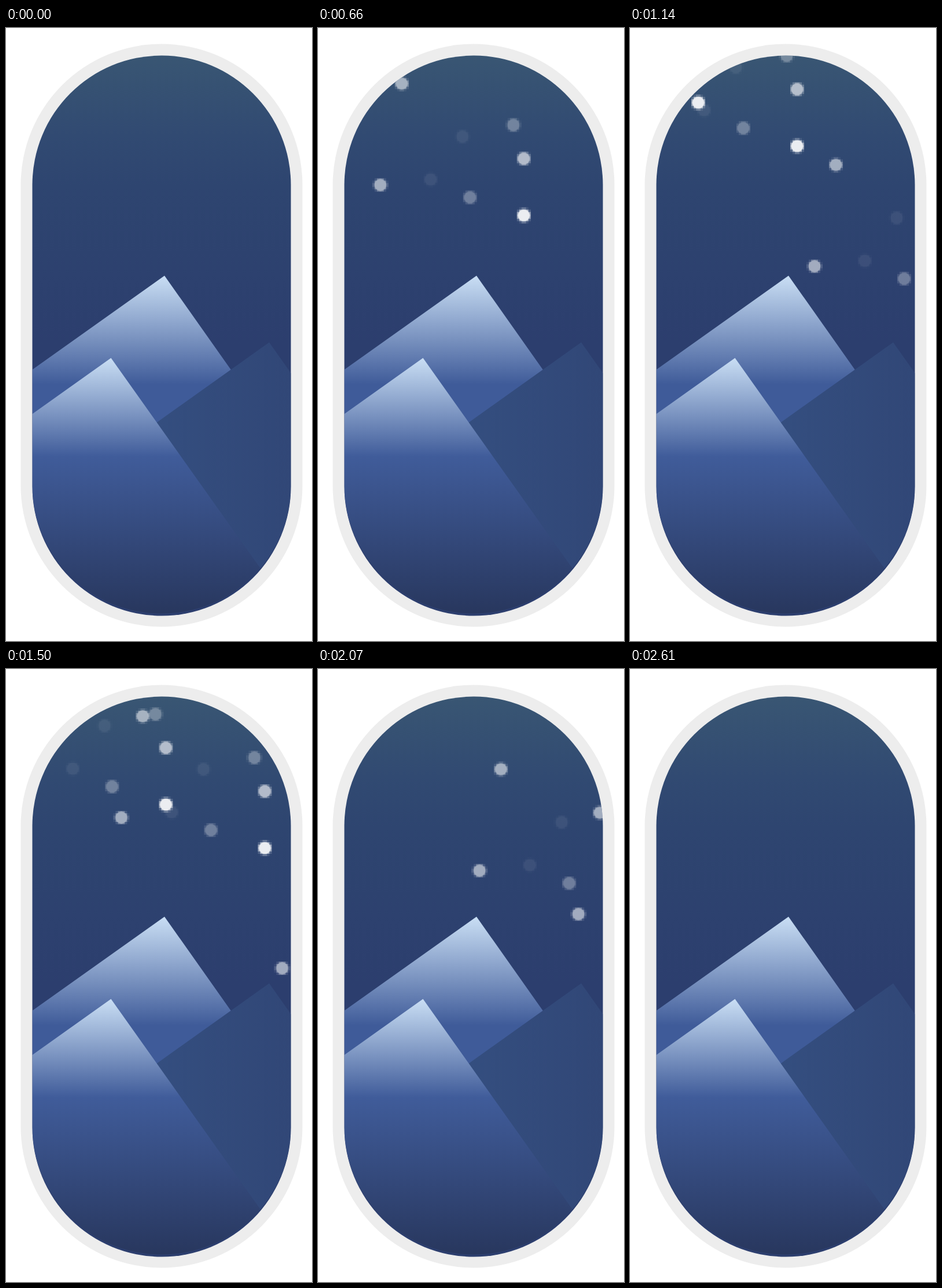
An HTML page that plays this animation: 529 by 1058 pixels, repeating every 2700 ms.

```html
<!DOCTYPE html>
<html lang="en">
<head>
<meta charset="utf-8">
<title>Night peaks</title>
<style>
  html, body { margin: 0; width: 100%; height: 100%; overflow: hidden; background: #fff; }
  svg { display: block; width: 100%; height: 100%; }
  /* 30 ms ticks; the small lead keeps each tick clear of its boundary */
  #sky { animation: drift 2700ms steps(90, end) -4ms infinite; }
  @keyframes drift {
    from { transform: translate(65.4px, 130.5px); }
    to { transform: translate(1253.4px, 919.7px); }
  }
</style>
</head>
<body>
<svg viewBox="0 0 529 1058" xmlns="http://www.w3.org/2000/svg">
  <defs>
    <clipPath id="window">
      <rect x="45.5" y="47.5" width="447" height="967" rx="223.5"/>
    </clipPath>
    <clipPath id="ground">
      <path d="M45.5 400H492.5V790.5A223.5 220 0 0 1 45.5 790.5Z"/>
    </clipPath>
    <linearGradient id="night" gradientUnits="userSpaceOnUse" x1="0" y1="47" x2="0" y2="547">
      <stop offset="0" stop-color="#395673"/>
      <stop offset=".28" stop-color="#314a72"/>
      <stop offset=".45" stop-color="#2e4570"/>
      <stop offset="1" stop-color="#2c3e6e"/>
    </linearGradient>
    <linearGradient id="back" gradientUnits="userSpaceOnUse" x1="0" y1="428" x2="0" y2="615">
      <stop offset="0" stop-color="#c9def4"/>
      <stop offset="1" stop-color="#3f5b99"/>
    </linearGradient>
    <linearGradient id="side" gradientUnits="userSpaceOnUse" x1="262" y1="0" x2="493" y2="0">
      <stop offset="0" stop-color="#344e7f"/>
      <stop offset="1" stop-color="#314777"/>
    </linearGradient>
    <linearGradient id="front" gradientUnits="userSpaceOnUse" x1="0" y1="570" x2="0" y2="1010">
      <stop offset="0" stop-color="#c9def4"/>
      <stop offset=".385" stop-color="#405c9a"/>
      <stop offset="1" stop-color="#28375e"/>
    </linearGradient>
    <g id="cluster"></g>
  </defs>

  <rect x="25.5" y="27.5" width="487" height="1006" rx="243.5" fill="#ededed"/>
  <g clip-path="url(#window)">
    <rect x="45" y="47" width="448" height="968" fill="url(#night)"/>
    <g id="sky">
      <use href="#cluster"/>
      <use href="#cluster" x="-278" y="-260"/>
      <use href="#cluster" x="-449" y="-335"/>
    </g>
    <g clip-path="url(#ground)">
      <path d="M274 427.5L529 788H40V593.5Z" fill="url(#back)"/>
      <path d="M455 542.5L529 647V1020H200V724Z" fill="url(#side)"/>
      <path d="M181.5 569.5L502 1020H40V670Z" fill="url(#front)"/>
    </g>
  </g>
</svg>
<script>
  const NS = 'http://www.w3.org/2000/svg';
  const CELL = 3.9;

  // x, y, opacity, halo columns, halo rows
  const stars = [
    [0, 0, 1, 6, 7],
    [0, -98, .7, 6, 6],
    [-18, -156, .35, 7, 6],
    [-93, -31, .35, 6, 6],
    [-106, -136, .08, 7, 6],
    [-161, -62, .08, 6, 7],
    [-248, -52.5, .62, 7, 6],
    [-211, -227.5, .62, 6, 7]
  ];

  function add(parent, tag, attrs) {
    const el = document.createElementNS(NS, tag);
    for (const k in attrs) el.setAttribute(k, attrs[k]);
    return parent.appendChild(el);
  }

  function addStar([x, y, opacity, cols, rows]) {
    const g = add(cluster, 'g', { transform: `translate(${x} ${y})`, opacity, fill: '#ebedf1' });
    for (let r = 0; r < rows; r++) {
      for (let c = 0; c < cols; c++) {
        const dx = (c - (cols - 1) / 2) * CELL;
        const dy = (r - (rows - 1) / 2) * CELL;
        const glow = .75 / (1 + Math.exp((Math.hypot(dx, dy) - 11.5) / .9));
        add(g, 'rect', {
          x: dx - CELL / 2, y: dy - CELL / 2, width: CELL, height: CELL,
          'fill-opacity': glow.toFixed(3), 'shape-rendering': 'crispEdges'
        });
      }
    }
    add(g, 'circle', { r: 10.3 });
  }

  const cluster = document.getElementById('cluster');
  stars.forEach(addStar);
</script>
</body>
</html>
```
